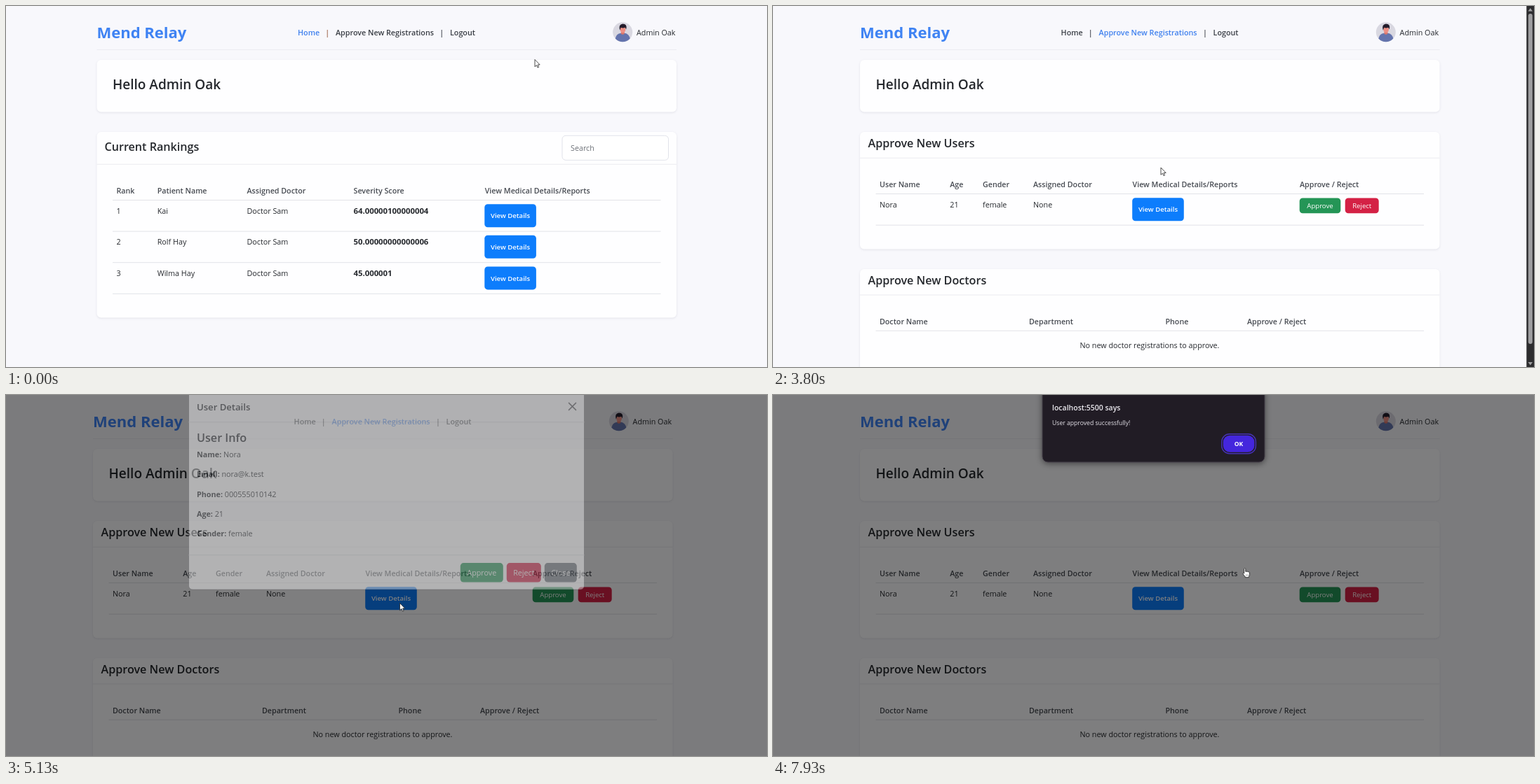
Animation of 1085 by 516 pixels, one loop 8 s. Source, as an HTML page:

```html
<!DOCTYPE html>
<html lang="en">
<head>
<meta charset="utf-8">
<title>Admin dashboard</title>
<style>
  html, body { margin: 0; width: 100%; height: 100%; overflow: hidden; background: #f8f8fc; }
  svg { display: block; width: 100vw; height: 100vh; }
  text { font-family: "Open Sans", "Noto Sans", sans-serif; font-size: 10.75px; fill: #25282d; white-space: pre; }
  .semi { font-weight: 600; font-size: 10.7px; fill: #474b52; }
  .nav { font-weight: 600; font-size: 10.75px; fill: #3a3e45; }
  .bold { font-weight: 700; }
  .score { font-weight: 700; font-size: 11.35px; }
  .h1 { font-weight: 700; font-size: 22px; fill: #3f83f3; }
  .h2 { font-weight: 600; font-size: 19px; }
  .h3 { font-weight: 600; font-size: 16.15px; }
  .h4 { font-weight: 600; font-size: 13.1px; }
  .btn { fill: #fff; text-anchor: middle; }
  .small { font-size: 9.6px; }
  .view { font-size: 9.6px; font-weight: 600; }
  .card { fill: #fefeff; filter: drop-shadow(0 1.5px 1.5px rgba(30, 30, 60, .1)); }
</style>
</head>
<body>
<svg id="stage" viewBox="0 0 1085 516" preserveAspectRatio="none"></svg>
<script>
const LOOP = 8000;
const BLUE = '#0d7dfc', GREEN = '#249556', RED = '#d42145', LINK = '#3f80ee', INK = '#3a3e45';

const text = (x, y, s, cls = '', extra = '') => `<text x="${x}" y="${y}" class="${cls}" ${extra}>${s}</text>`;
const rect = (x, y, w, h, r, fill, extra = '') =>
  `<rect x="${x}" y="${y}" width="${w}" height="${h}" rx="${r}" fill="${fill}" ${extra}/>`;
const line = (x1, x2, y, c = '#e2e3e8') => `<path d="M${x1} ${y}H${x2}" stroke="${c}" stroke-width="1"/>`;
const card = (x, y, h) => rect(x, y, 826.5, h, 6, '#fefeff', 'class="card"');
const button = (x, y, w, h, label, fill, cls, dy, extra = '') =>
  `<g ${extra}>${rect(x, y, w, h, 4.5, fill)}${text(x + w / 2, y + dy, label, 'btn ' + cls)}</g>`;
const viewButton = (x, y, extra) => button(x, y, 73.6, 33, 'View Details', BLUE, 'view', 20.1, extra);
const heads = (y, cols) => cols.map(([x, s]) => text(x, y, s, 'semi')).join('');

const header = `
  ${text(129.5, 46, 'Mend Relay', 'h1')}
  ${text(416, 42, 'Home', 'nav', 'id="home"')}
  ${text(458.2, 41.5, '|', 'nav', 'id="bar1" text-anchor="middle"')}
  ${text(470, 42, 'Approve New Registrations', 'nav', 'id="approveLink"')}
  ${text(621.3, 41.5, '|', 'nav', 'text-anchor="middle"')}
  ${text(633, 42, 'Logout', 'nav')}
  <g transform="translate(879.2 37.3)">
    <circle r="14" fill="#d9d8e1"/>
    <path d="M-10.5 9.300Q-9 2-2.500 1.500H3Q9 2.500 10.500 9.300A14 14 0 0 1-10.500 9.300Z" fill="#6474ad"/>
    <path d="M-2.400 0H2.600V2.500Q0 4.500-2.400 2.500Z" fill="#d9776c"/>
    <ellipse cx="0.3" cy="-3.600" rx="3.800" ry="4.800" fill="#ee8f84"/>
    <path d="M-4-2.500Q-6.500-11 0-11.800Q7-11.800 5-3.800L3.500-6.500Q0-5-2.500-6.500Z" fill="#231c2b"/>
  </g>
  ${text(899, 42, 'Admin Oak')}
  ${line(129.5, 956, 62.5, '#ebebf1')}
  ${card(129.5, 77, 74.5)}
  ${text(152, 118.8, 'Hello Admin Oak', 'h2')}`;

const patients = [
  ['Kai', '64.00000100000004'],
  ['Rolf Hay', '50.00000000000006'],
  ['Wilma Hay', '45.000001'],
];
const rankings = `
  ${card(129.5, 180, 265.5)}
  ${text(140.5, 206.5, 'Current Rankings', 'h3')}
  ${rect(793, 185.3, 151.5, 35, 5, '#fff', 'stroke="#e2e3ea"')}
  ${text(805, 207, 'Search', '', 'style="fill:#6d7178"')}
  ${line(129.5, 956, 226.2, '#ebebf0')}
  ${heads(267.8, [[157.5, 'Rank'], [215.7, 'Patient Name'], [343.5, 'Assigned Doctor'],
    [495.5, 'Severity Score'], [682.7, 'View Medical Details/Reports']])}
  ${line(152, 933.5, 277.5)}
  ${patients.map(([name, score], i) => {
    const y = 296.7 + i * 44.6;
    return text(157.5, y, i + 1) + text(215.7, y, name) + text(343.5, y, 'Doctor Sam') +
      text(495.5, y, score, 'score') + viewButton(682.3, y - 13.5) + line(152, 933.5, y + 25.4);
  }).join('')}`;

const approvals = `
  ${card(124, 180, 167.5)}
  ${text(135.5, 202, 'Approve New Users', 'h3')}
  ${line(124, 950.5, 217.2, '#ebebf0')}
  ${heads(258.8, [[152, 'User Name'], [252.3, 'Age'], [299, 'Gender'], [371, 'Assigned Doctor'],
    [512.5, 'View Medical Details/Reports'], [751, 'Approve / Reject']])}
  ${line(146.5, 928, 268.5)}
  ${text(152, 287.6, 'Nora')}${text(252.3, 287.6, '21')}${text(299, 287.6, 'female')}${text(371, 287.6, 'None')}
  ${viewButton(512.2, 274.2, 'id="view"')}
  ${button(750.7, 274.4, 58.6, 21.8, 'Approve', GREEN, 'small', 14.5)}
  ${button(815.7, 274.4, 48, 21.8, 'Reject', RED, 'small', 14.5)}
  ${line(146.5, 928, 313.2)}
  ${card(124, 376, 170)}
  ${text(135.5, 398, 'Approve New Doctors', 'h3')}
  ${line(124, 950.5, 413, '#ebebf0')}
  ${heads(454.8, [[152, 'Doctor Name'], [365, 'Department'], [559.5, 'Phone'], [676, 'Approve / Reject']])}
  ${line(146.5, 928, 464.2)}
  ${text(537, 489, 'No new doctor registrations to approve.', '', 'text-anchor="middle"')}`;

const scrollbar = `
  ${rect(1074.3, 0, 11, 516, 0, '#2c2c2e')}
  ${rect(1076.8, 11, 6, 472, 3, '#9f9fa1')}
  <path d="M1076.500 7.500L1079.800 3L1083 7.500ZM1076.500 509L1079.800 513.500L1083 509Z" fill="#9f9fa1"/>`;

const status = `
  <path d="M0 502H224Q227 502 227 505V516H0Z" fill="#aaa8ae"/>
  ${text(3, 512.6, 'localhost:5500/frontend/pages/approve-registrations.html', '', 'style="font-size:8.03px;fill:#f4f4f6"')}`;

const info = [['Name', 'Nora'], ['Email', 'nora@k.test'], ['Phone', '000555010142'], ['Age', '21'], ['Gender', 'female']];
const modal = `
  ${rect(260.5, 18.5, 564, 284, 5.5, '#fefeff', 'stroke="#56555a" stroke-width=".6"')}
  ${text(272, 46, 'User Details', 'h4')}
  <path d="M802.500 35.800l10 10m0-10l-10 10" stroke="#5c5d62" stroke-width="1.5" stroke-linecap="round"/>
  ${line(260.5, 824.5, 63.2)}
  ${text(272, 91.5, 'User Info', 'h3')}
  ${info.map(([k, v], i) => text(272, 113.7 + i * 28.2, `<tspan class="bold">${k}:</tspan> ${v}`)).join('')}
  ${line(260.5, 824.5, 253.2)}
  ${button(647.8, 264.5, 61, 27.5, 'Approve', GREEN, '', 17.8, 'id="confirm"')}
  ${button(713.8, 264.5, 49, 27.5, 'Reject', RED, '', 17.8)}
  ${button(767.8, 264.5, 46, 27.5, 'Close', '#6c737b', '', 17.8)}`;

const alertBox = `
  ${rect(384, -12, 317, 108, 8, '#211c25', 'stroke="#48434c" style="filter:drop-shadow(0 2px 4px rgba(0,0,0,.45))"')}
  ${text(398, 22.4, 'localhost:5500 says', '', 'style="font-size:10.5px;font-weight:600;fill:#eceaf0"')}
  ${text(398, 43.2, 'User approved successfully!', '', 'style="font-size:8.65px;fill:#e4e1e8"')}
  ${rect(639.8, 55.7, 48.6, 28, 11, 'none', 'stroke="#4632b4" stroke-width="1.4"')}
  ${rect(641.8, 57.7, 44.6, 24, 9.5, '#4426dd')}
  ${text(664, 73, 'OK', 'btn bold', 'style="font-size:8.6px"')}`;

const cursors = `
  <g id="pointer"><path d="M0 0V10.300L2.400 8.100L4 11.600L5.600 10.900L4.100 7.500H7.200Z"
    fill="#fff" stroke="#222" stroke-width=".8" stroke-linejoin="round"/></g>
  <g id="hand"><path d="M-.8.800Q.3-.6 1.300.8V5Q2.300 4 3.300 5Q4.300 4.200 5.200 5.400Q6.600 4.800 7 6.300V9.200
    Q6.800 11 5.900 12V13.200H.6V12Q-1.500 10-3 7.300Q-2.600 5.800-.8 7.600Z"
    fill="#fff" stroke="#222" stroke-width=".85" stroke-linejoin="round"/>
    <path d="M2 9V11M3.500 9V11M5 9V11" stroke="#555" stroke-width=".5"/></g>`;

const stage = document.getElementById('stage');
const group = (id, body) => `<g id="${id}">${body}</g>`;
stage.innerHTML = rect(0, 0, 1085, 516, 0, '#f8f8fc') +
  group('header', header) + group('rankings', rankings) + group('approvals', approvals) +
  group('scrollbar', scrollbar) + group('status', status) +
  rect(0, 0, 1085, 516, 0, '#000', 'id="backdrop"') +
  group('modal', modal) + group('alertBox', alertBox) + cursors;

const el = id => document.getElementById(id);
const show = (id, on) => { el(id).style.display = on ? '' : 'none'; };
const ramp = (t, a, b) => Math.min(1, Math.max(0, (t - a) / (b - a)));
const easeOut = p => 1 - Math.pow(1 - p, 1.65);
const smooth = p => p * p * (3 - 2 * p);

// Each move: start, end, destination.
const START = [754, 76.5];
const MOVES = [
  [250, 1250, 501.5, 36],
  [3020, 3700, 553, 231],
  [4150, 4650, 561.5, 297.5],
  [5280, 5850, 666.5, 286.5],
  [7250, 7800, 672.5, 247.5],
];
function cursorAt(t) {
  let [x, y] = START;
  for (const [a, b, tx, ty] of MOVES) {
    const p = smooth(ramp(t, a, b));
    x += (tx - x) * p;
    y += (ty - y) * p;
  }
  return [x, y];
}
const inside = ([x, y], x1, y1, x2, y2) => x >= x1 && x <= x2 && y >= y1 && y <= y2;

const PAGE = 2930, DIM = 4890, OPEN = 5070, CLOSE = 7080, ALERT = 7400;

function draw(t) {
  const second = t >= PAGE;
  const pos = cursorAt(t);
  const dimmed = t >= DIM;

  show('rankings', !second);
  show('approvals', second);
  show('scrollbar', second && !dimmed);
  el('header').setAttribute('transform', `translate(${second ? -5.4 : 0} 0)`);

  const onLink = !dimmed && inside(pos, 464, 31, 610, 47);
  el('home').style.fill = second ? INK : LINK;
  el('bar1').style.fill = second ? INK : '#9c6146';
  el('approveLink').style.fill = second || onLink ? LINK : INK;
  show('status', onLink);

  const onView = second && inside(pos, 512, 274, 586, 307);
  const hover = onView && t < OPEN - 30;
  el('view').setAttribute('transform', `translate(0 ${hover ? -1.4 : 0})`);
  el('view').style.filter = hover ? 'drop-shadow(0 2px 2px rgba(0,0,0,.2))' : '';
  el('view').firstChild.setAttribute('fill', hover ? '#2659d0' : BLUE);

  el('backdrop').setAttribute('opacity', 0.5 * ramp(t, DIM, DIM + 150));

  const inP = ramp(t, OPEN, OPEN + 300), outP = ramp(t, CLOSE, CLOSE + 300);
  const opacity = ramp(t, OPEN, OPEN + 150) * (1 - ramp(t, CLOSE, CLOSE + 150));
  show('modal', opacity > 0);
  el('modal').setAttribute('opacity', opacity);
  el('modal').setAttribute('transform', `translate(0 ${-35.5 * (1 - easeOut(inP) + easeOut(outP))})`);
  const onConfirm = t >= OPEN && inside(pos, 648, 265, 708, 292);
  el('confirm').firstChild.setAttribute('fill', onConfirm ? '#1c8146' : GREEN);

  show('alertBox', t >= ALERT);
  el('alertBox').setAttribute('opacity', ramp(t, ALERT - 40, ALERT + 100));

  const hand = onLink || (onView && !dimmed) || onConfirm || t >= CLOSE;
  show('hand', hand);
  show('pointer', !hand);
  el(hand ? 'hand' : 'pointer').setAttribute('transform', `translate(${pos[0]} ${pos[1]})`);
}

function tick() {
  draw(performance.now() % LOOP);
  requestAnimationFrame(tick);
}
tick();
</script>
</body>
</html>
```
